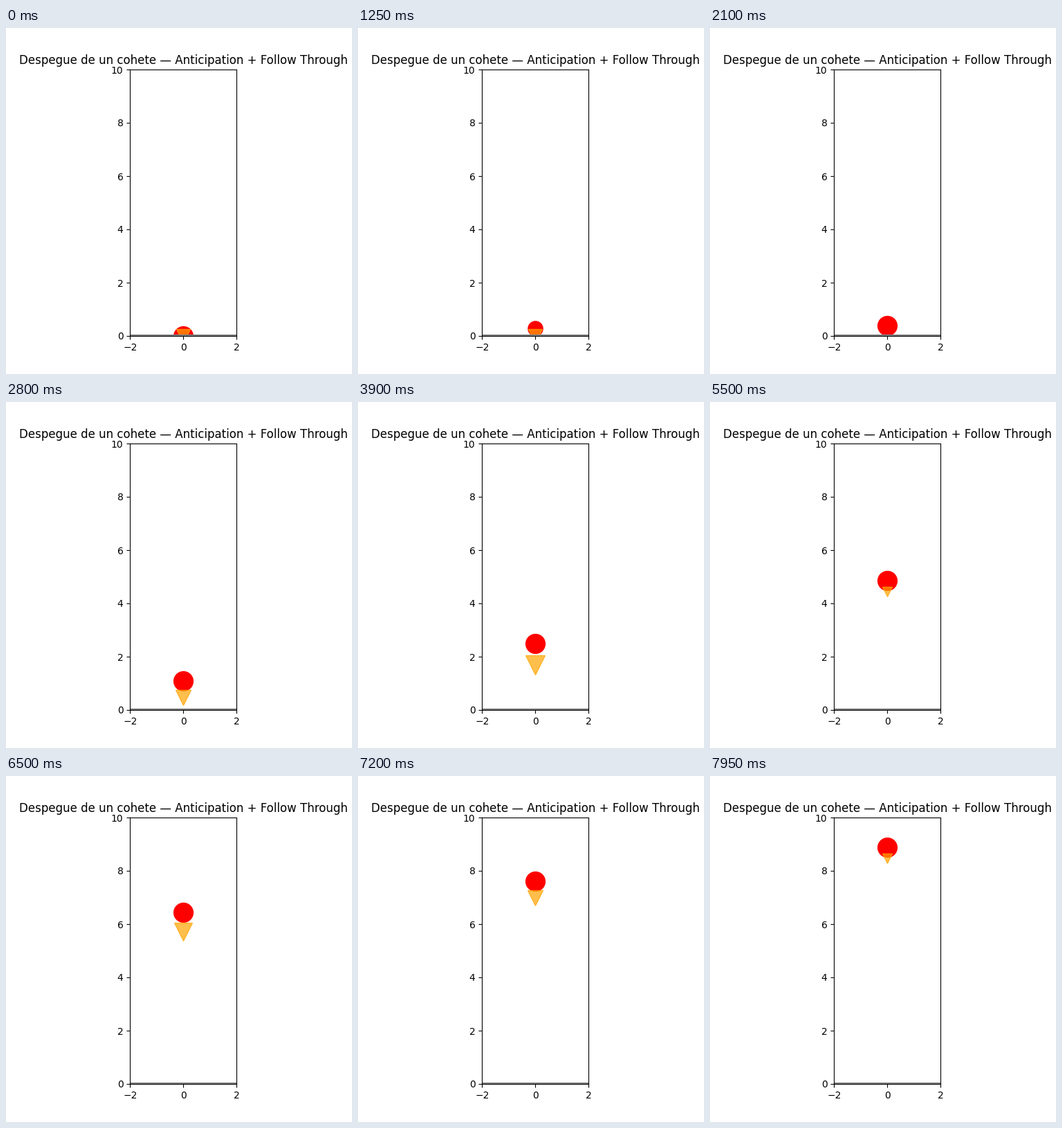
A matplotlib script for the animation above (8 s loop, 500 px wide and 500 px high).

```python
import numpy as np
import matplotlib.pyplot as plt
from matplotlib.animation import FuncAnimation

FRAMES = 160
INTERVAL = 50
LAUNCH = 40

fig, ax = plt.subplots(figsize=(5, 5), dpi=100)
ax.set_xlim(-2, 2)
ax.set_ylim(0, 10)
ax.set_aspect("equal")
ax.set_xticks([-2, 0, 2])
ax.set_yticks(range(0, 11, 2))
ax.set_title("Despegue de un cohete — Anticipation + Follow Through")

rocket, = ax.plot([0], [0], "o", color="red", markersize=20)
flame, = ax.plot([0], [0], "v", color="orange", markersize=15, alpha=0.7)
ground = ax.axhline(0, color="gray", linewidth=3)


def place(marker, y, size):
    marker.set_data([0], [y])
    marker.set_markersize(size)


def update(frame):
    if frame < LAUNCH:
        # Anticipation: the body squeezes and bounces on the ground
        squash = abs(np.sin(0.2 * frame))
        place(rocket, 0.3 * squash, 20 - 5 * squash)
        place(flame, 0, 15)
    else:
        # Lift-off with a flickering flame trailing behind
        y = 0.325 + 0.02764 * (frame - LAUNCH) ** 1.2
        size = 15 + 5 * np.sin(0.5 * frame + 0.2)
        place(rocket, y, 20)
        place(flame, y - 0.04 * size, size)
    return rocket, flame


def init():
    return update(0)


anim = FuncAnimation(fig, update, frames=FRAMES, init_func=init,
                     interval=INTERVAL, repeat=True, repeat_delay=0)
plt.show()
```
